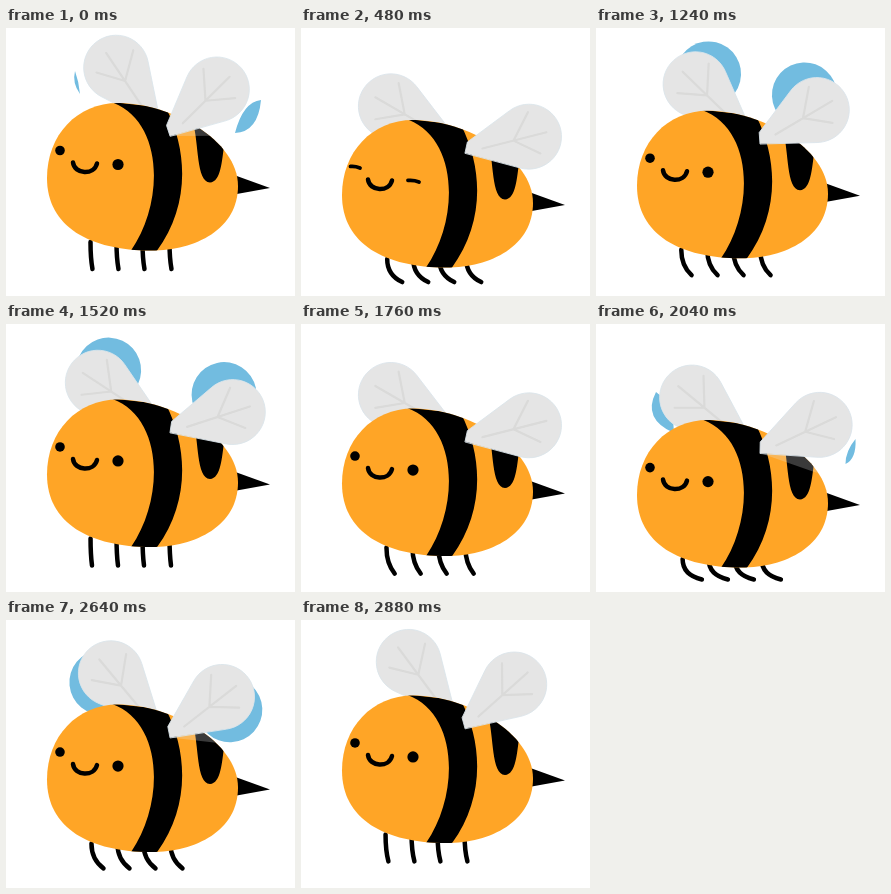
Animation, 289 px wide and 268 px high, one loop 2.92 s. Source, as an HTML page with a canvas:

```html
<!DOCTYPE html>
<html lang="en">
<head>
<meta charset="utf-8">
<title>Flying bee</title>
<style>
html, body { margin: 0; width: 100%; height: 100%; overflow: hidden; background: #fff; }
canvas { display: block; width: 289px; height: 268px; }
</style>
</head>
<body>
<canvas id="stage"></canvas>
<script>
const LOOP = 2920, STEP = 40, BOB_STEPS = 36, FLAP_STEPS = 8;
const ORANGE = '#ffa526', BLUE = '#72bce0', WING = '#e5e5e5', VEIN = '#dadad9';

const canvas = document.getElementById('stage');
const ctx = canvas.getContext('2d');
const ratio = window.devicePixelRatio || 1;
canvas.width = 289 * ratio;
canvas.height = 268 * ratio;

const body = new Path2D('M41 150C41 107 71 75 112 75C165 75 232 112 232 158C232 201 190 222.500 145 222.500C84 222.500 41 199 41 150Z');
const stripe = new Path2D('M105 74C158 92 159 175 124 224L150 224C183 180 183 125 160 80Z');
const spot = new Path2D('M187 95C193 115 190 154 204 154.500C215 154 216 132 218 118L218 95Z');
const stinger = new Path2D('M228 147L264 160L228 166.500Z');
const mouth = new Path2D('M67 134.500C68.500 146.500 88 147.500 91 135.500');
const closedEyes = new Path2D('M49.500 121.500Q54 121 59 123M107 135.500Q113 135 118 137');
const wingShape = new Path2D('M0 0L5 -10L53.600 -30A32.500 32.500 0 1 1 50 28.300Z');
const wingTip = new Path2D('M33.500 0a32.500 32.500 0 1 1 65 0a32.500 32.500 0 1 1 -65 0Z');
const veins = new Path2D('M18 0H84M50 0L71 -24M50 0L73 19');

// Small streaks next to the wings, by step of the flap.
const streaks = {
  0: new Path2D('M69 43Q66 55 74 66Q73 54 69 43ZM255 72Q237 74 229 105Q252 104 255 72Z'),
  2: new Path2D('M60 47Q46 74 78 88L76 60ZM259.500 94Q249.500 106 249.500 119Q260.500 114 259.500 94Z')
};

const bobAt = step => 23.3 * Math.abs(Math.sin(Math.PI * step / BOB_STEPS)) ** 1.6;
const flapAt = step => 28 + 17 * Math.cos(2 * Math.PI * (step + 0.2) / FLAP_STEPS);

function fill(path, color) {
  ctx.fillStyle = color;
  ctx.fill(path);
}

function stroke(path, color, width) {
  ctx.strokeStyle = color;
  ctx.lineWidth = width;
  ctx.stroke(path);
}

// side is 1 for the near wing and -1 for the far one; lift is in degrees.
function onWing(side, lift, paint) {
  ctx.save();
  if (side > 0) ctx.translate(164, 108);
  else {
    ctx.translate(147, 94.5);
    ctx.scale(-1, 1);
    lift = 18 + 0.85 * lift;
  }
  ctx.rotate(-lift * Math.PI / 180);
  paint();
  ctx.restore();
}

function paintWing() {
  fill(wingShape, WING);
  stroke(wingShape, '#dbe5eb', 0.8);
  stroke(veins, VEIN, 2.2);
}

function legs(bob, bend) {
  const path = new Path2D();
  for (const x of [84.5, 110.5, 136.5, 163.5]) {
    const top = x + 0.1 * bob;
    path.moveTo(top, 214);
    path.quadraticCurveTo(top, 230, x + 1.5 + bend, 241 - bend * bend / 60);
  }
  stroke(path, '#000', 4.5);
}

function eye(x, y, radius) {
  const path = new Path2D();
  path.arc(x, y, radius, 0, 2 * Math.PI);
  fill(path, '#000');
}

function draw(step) {
  const bob = bobAt(step), lift = flapAt(step), phase = step % FLAP_STEPS;
  ctx.setTransform(ratio, 0, 0, ratio, 0, 0);
  ctx.clearRect(0, 0, 289, 268);
  ctx.lineCap = ctx.lineJoin = 'round';
  ctx.translate(0, bob);

  const trail = phase === 1 ? -13 : phase >= 4 && phase <= 6 ? 17 : 0;
  if (trail) for (const side of [-1, 1]) onWing(side, lift + trail, () => fill(wingTip, BLUE));
  if (streaks[phase]) fill(streaks[phase], BLUE);

  onWing(-1, lift, paintWing);
  legs(bob, bobAt(step - 1));
  fill(stinger, '#000');
  fill(body, ORANGE);

  ctx.save();
  ctx.clip(body);
  fill(stripe, '#000');
  fill(spot, '#000');
  if (phase < 3) onWing(1, lift - 15, () => fill(wingShape, 'rgba(229,229,229,.25)'));
  ctx.restore();

  onWing(1, lift, paintWing);

  stroke(mouth, '#000', 4.5);
  if (step >= 10 && step <= 13) stroke(closedEyes, '#000', 3.8);
  else {
    eye(54, 122.5, 4.8);
    eye(112, 136.5, 5.6);
  }
}

function tick(now) {
  // The first pose is held for two steps.
  draw(Math.max(0, Math.floor(now % LOOP / STEP) - 1));
  requestAnimationFrame(tick);
}

draw(0);
requestAnimationFrame(tick);
</script>
</body>
</html>
```
